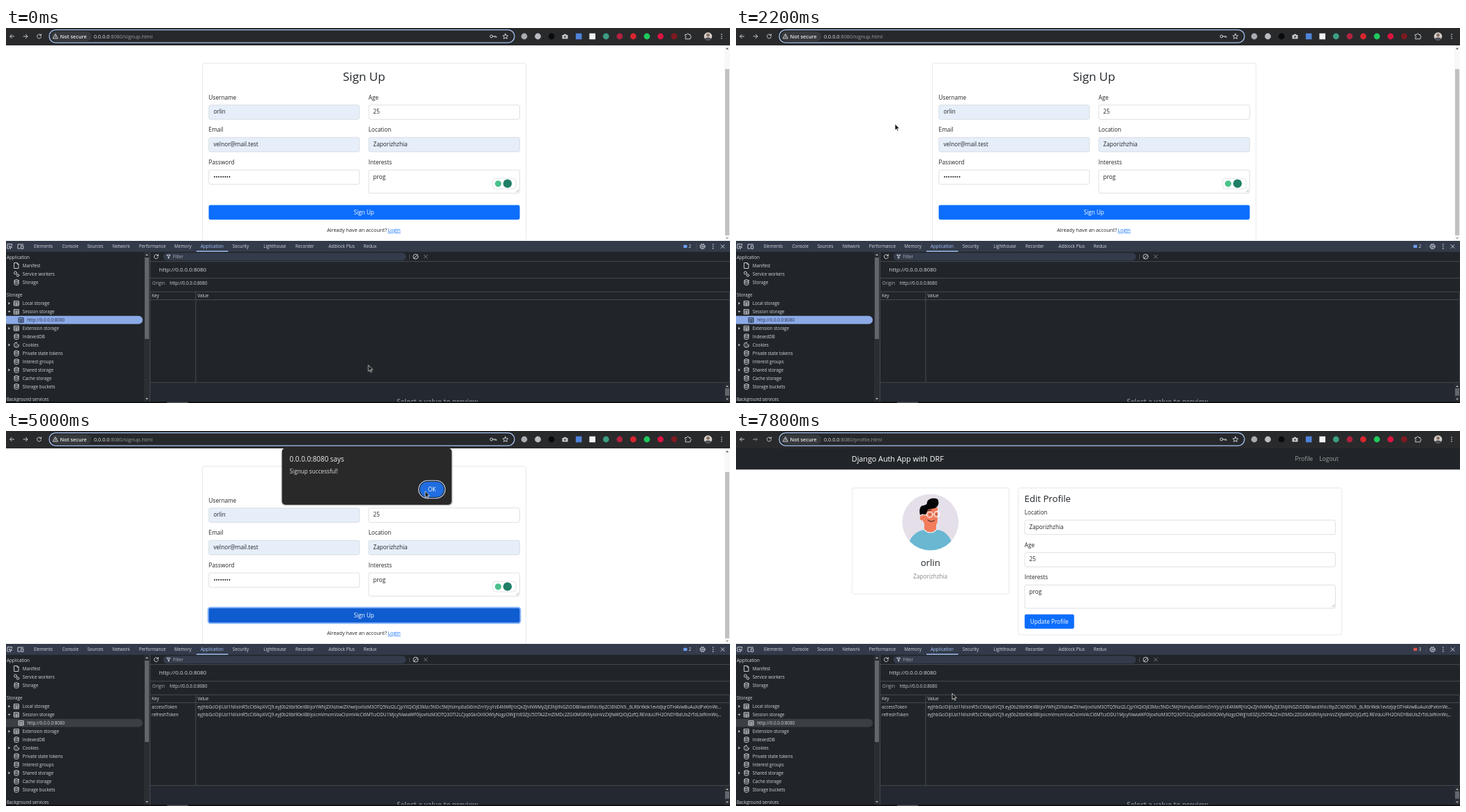
Animation of 1038 by 539 pixels, one loop 8 s. Source, as an HTML page:

```html
<!DOCTYPE html>
<html lang="en">
<head>
<meta charset="utf-8">
<title>Sign up and profile</title>
<style>
html, body { margin: 0; width: 100%; height: 100%; overflow: hidden; background: #212529; }
svg { display: block; width: 100vw; height: 100vh; }
text { font: 8.2px "Open Sans", "Noto Sans", sans-serif; fill: #212529; white-space: pre; }
.mid { text-anchor: middle; }
.h1 { font-size: 17px; }
.h2 { font-size: 13.2px; }
.link { font-size: 7.27px; fill: #0d6efd; text-decoration: underline; }
.note { font-size: 7.27px; }
.nav { font-size: 8.5px; fill: #a0a2a4; }
.brand { font-size: 10.75px; fill: #fff; }
.url { font-size: 7.3px; fill: #9a9da2; }
.url .host { fill: #e6e7e9; }
.white { fill: #fff; }
.dev text { font-size: 6.3px; fill: #d4d8dd; }
.dev .on { fill: #a8c7fa; }
.dev .title { font-size: 7.9px; }
.dev .dim { fill: #aab0b8; }
.line { fill: none; stroke: #c7cbd1; stroke-width: 1; stroke-linecap: round; stroke-linejoin: round; }
.rule { stroke: #50565f; stroke-width: .8; fill: none; }
.card { fill: #fff; stroke: #dfe1e5; stroke-width: .8; }
.box { fill: #fff; stroke: #d3d8de; stroke-width: .8; }
.auto { fill: #e6eef9; }

.t { animation: 8s step-end infinite; }
.signup { animation-name: signup; }
.profile { animation-name: profile; }
.loading { animation-name: loading; }
.settled { animation-name: settled; }
.loaded { animation-name: loaded; }
.before { animation-name: before; }
.clicked { animation-name: clicked; }
.hover { animation-name: hover; }
.tokens { animation-name: tokens; }
.dialog { animation-name: dialog; }
.scroll { animation-name: scroll; }
.thumb { animation-name: thumb; }
.cursor { animation-name: cursor; }
.arrow { animation-name: arrow; }
.beam { animation-name: beam; }
@keyframes signup { from { opacity: 1 } 72.5%, to { opacity: 0 } }
@keyframes profile { from { opacity: 0 } 72.5%, to { opacity: 1 } }
@keyframes loading { from { opacity: 0 } 72.5% { opacity: 1 } 75%, to { opacity: 0 } }
@keyframes settled { from { opacity: 1 } 72.5% { opacity: 0 } 75%, to { opacity: 1 } }
@keyframes loaded { from { opacity: 0 } 75%, to { opacity: 1 } }
@keyframes before { from { opacity: 1 } 45%, to { opacity: 0 } }
@keyframes clicked { from { opacity: 0 } 45%, to { opacity: 1 } }
@keyframes hover { from { opacity: 0 } 45%, to { opacity: 1 } }
@keyframes tokens { from { opacity: 0 } 57.5%, to { opacity: 1 } }
@keyframes dialog {
  from { opacity: 0; transform: none }
  57.5% { opacity: 1; transform: none }
  72.5% { opacity: .2; transform: translateY(-4.8px) }
  75%, to { opacity: 0; transform: none }
}
@keyframes scroll { from { transform: none } 22.5% { transform: translateY(2.6px) } 25%, to { transform: none } }
@keyframes thumb { from { transform: none } 22.5% { transform: translateY(-2px) } 25%, to { transform: none } }
@keyframes cursor {
  0% { transform: translate(519.5px, 484.5px) }
  2.5% { transform: translate(590px, 505px) }
  5% { transform: translate(680px, 462px) }
  7.5% { transform: translate(520px, 440px) }
  10% { transform: translate(260px, 425px) }
  12.5% { transform: translate(24px, 400px) }
  15% { transform: translate(160px, 124px) }
  17.5% { transform: translate(196px, 128px) }
  20% { transform: translate(222px, 133px) }
  22.5% { transform: translate(231px, 135px) }
  27.5% { transform: translate(228px, 138px) }
  32.5% { transform: translate(223px, 141px) }
  35% { transform: translate(240px, 150px) }
  37.5% { transform: translate(300px, 180px) }
  40% { transform: translate(390px, 215px) }
  42.5% { transform: translate(480px, 246px) }
  45% { transform: translate(528px, 262px) }
  50% { transform: translate(531px, 246px) }
  52.5% { transform: translate(529px, 219px) }
  55% { transform: translate(548px, 180px) }
  57.5% { transform: translate(574px, 130px) }
  60% { transform: translate(596px, 95px) }
  62.5% { transform: translate(601px, 86.5px) }
  72.5% { transform: translate(613.7px, 149px) }
  75% { transform: translate(746px, 161px) }
  77.5% { transform: translate(749px, 164px) }
  80% { transform: translate(752px, 167px) }
  85% { transform: translate(700px, 188px) }
  87.5% { transform: translate(600px, 240px) }
  90% { transform: translate(480px, 300px) }
  92.5% { transform: translate(390px, 350px) }
  95% { transform: translate(330px, 372px) }
  97.5%, 100% { transform: translate(310px, 377px) }
}
@keyframes arrow {
  from { opacity: 1 } 40% { opacity: 0 } 42.5% { opacity: 1 } 52.5% { opacity: 0 } 55% { opacity: 1 }
  72.5% { opacity: 0 } 75% { opacity: 1 } 85% { opacity: 0 } 90%, to { opacity: 1 }
}
@keyframes beam {
  from { opacity: 0 } 40% { opacity: 1 } 42.5% { opacity: 0 } 52.5% { opacity: 1 } 55% { opacity: 0 }
  72.5% { opacity: 1 } 75% { opacity: 0 } 85% { opacity: 1 } 90%, to { opacity: 0 }
}
</style>
</head>
<body>
<svg viewBox="0 0 1038 539">
  <defs>
    <clipPath id="view"><rect y="25" width="1038" height="280.5"/></clipPath>
    <clipPath id="cell"><rect x="272" y="390" width="748.5" height="24"/></clipPath>
    <clipPath id="disc"><circle cx="278.7" cy="131" r="40.5"/></clipPath>
    <clipPath id="pane"><rect x="207" y="511" width="822" height="26.5"/></clipPath>
    <g id="doc"><path class="line" d="M-3-4H1L3-2V4H-3ZM1-4V-2H3"/></g>
    <g id="db" class="line"><ellipse cy="-2.4" rx="3" ry="1.3"/><path d="M-3-2.4V2.6C-3 4.3 3 4.3 3 2.6V-2.4M-3 .1C-3 1.8 3 1.8 3 .1"/></g>
    <g id="grid"><path class="line" d="M-3.3-3.3H3.3V3.3H-3.3ZM-3.3-1H3.3M-3.3 1.2H3.3M0-1V3.3"/></g>
    <g id="gears" class="line"><circle cx="-1.5" cy="-1.5" r="2"/><circle cx="2" cy="2" r="1.7"/></g>
    <g id="cookie" class="line"><path d="M0-3.6A3.6 3.6 0 1 0 3.6 0C2 .3 1.3-.5 1.4-1.5C.2-1.4-.4-2.4 0-3.6Z"/><path d="M-1.4-.6h.1M-.8 1.6h.1M1 1.4h.1"/></g>
    <g id="reload"><path class="line" d="M2.6-1.6A3 3 0 1 0 3 .6M3-3.2V-1.2H1"/></g>
    <path id="cross" class="line" d="M-2.4-2.4L2.4 2.4M2.4-2.4L-2.4 2.4"/>
    <g id="dots"><circle cy="-2.9" r=".8"/><circle r=".8"/><circle cy="2.9" r=".8"/></g>
    <path id="tri" d="M-2 1.1H2L0-1.3Z"/>
  </defs>

  <!-- page -->
  <rect y="25" width="1038" height="281" fill="#fff"/>
  <g clip-path="url(#view)">
    <g class="t signup">
      <g class="t scroll">
        <rect y="-6" width="1038" height="30.6" fill="#212529"/>
        <rect class="card" x="281.6" y="50.7" width="464" height="290" rx="3"/>
        <text class="h1 mid" x="513.3" y="76">Sign Up</text>
        <g id="form"></g>
        <path d="M731.5 235.8L735 232.3M733.7 235.8L735 234.5" stroke="#777" stroke-width=".6"/>
        <rect x="697.7" y="216.3" width="33.5" height="14.8" rx="4" fill="#fff" stroke="#d9dce0" stroke-width=".8"/>
        <circle cx="705.6" cy="223.8" r="4.6" fill="#4cc18c"/>
        <circle cx="719" cy="223.6" r="6.2" fill="#1f7f66"/>
        <rect x="290.6" y="254.6" width="446" height="20.8" rx="2.4" fill="#0d6efd"/>
        <g class="t hover">
          <rect x="289.8" y="253.8" width="447.6" height="22.4" rx="3.2" fill="none" stroke="#86b4fa" stroke-width="2"/>
          <rect x="290.8" y="254.8" width="445.6" height="20.4" rx="2.2" fill="#0e5cd0"/>
        </g>
        <text class="white mid" x="513.3" y="268">Sign Up</text>
        <text class="note" x="460.2" y="293.3">Already have an account?</text>
        <text class="link" x="547.3" y="293.3">Login</text>
      </g>
      <rect x="1030" y="25" width="8" height="281" fill="#f8f8f8"/>
      <rect class="t thumb" x="1031" y="59" width="6" height="239" fill="#c1c1c1"/>
      <use href="#tri" x="1034" y="29.5" fill="#505050"/>
      <use href="#tri" transform="translate(1034 302) scale(1 -1)" fill="#9a9a9a"/>
    </g>

    <g class="t profile">
      <rect y="25" width="1038" height="281" fill="#fff"/>
      <rect y="25" width="1038" height="30.4" fill="#212529"/>
      <text class="brand" x="165.8" y="43.8">Django Auth App with DRF</text>
      <text class="nav" x="801.6" y="43">Profile</text>
      <text class="nav" x="836.2" y="43">Logout</text>
      <rect class="card t loading" x="166.4" y="81.8" width="225" height="116.4" rx="3"/>
      <rect class="card t loaded" x="166.4" y="81.8" width="225" height="152.3" rx="3"/>
      <g clip-path="url(#disc)">
        <circle cx="278.7" cy="131" r="40.5" fill="#e5dfea"/>
        <path d="M245 173C247 155 256 144 270 142H287C302 143 309 154 313 173Z" fill="#6ab7d1"/>
        <path d="M270 128V142C274 147 283 147 287 142V130Z" fill="#f27c5c"/>
        <path d="M269.5 141.5C274 147.5 283 147.5 287.5 141.5" fill="none" stroke="#fff" stroke-width="1.2"/>
        <path d="M268 110H289V127C289 137 283 139 279 138C272 137 267 131 267 124Z" fill="#f27c5c"/>
        <circle cx="267" cy="125" r="3.4" fill="#f27c5c"/>
        <path d="M264 121C262 113 264 107 269 107C272 106 274 106 274 102C276 96 285 96 289 98C292 103 290 109 285 111C281 112 278 112 275 113C274 117 272 120 270 121C268 119 266 119 264 121Z" fill="#050505"/>
        <path d="M267 120L274 121M281.7 119.8H284" stroke="#fff" fill="none"/>
        <circle cx="277.8" cy="120.3" r="4" fill="none" stroke="#fff" stroke-width="1.1"/>
        <circle cx="288" cy="119.5" r="3.9" fill="none" stroke="#fff" stroke-width="1.1"/>
        <path d="M275 114.5L280 113.8M278 120h.6M287 119.5h.6M275 128C278 131 283 130.5 285 128" fill="none" stroke="#151515" stroke-linecap="round"/>
      </g>
      <g class="t loaded">
        <text class="h2 mid" x="278.7" y="193.8">orlin</text>
        <text class="mid" x="278.7" y="212.2" style="fill:#818589">Zaporizhzhia</text>
      </g>
      <rect class="card" x="404.6" y="81.8" width="464" height="211.2" rx="3"/>
      <text class="h2" x="413.6" y="102.4">Edit Profile</text>
      <g id="edit"></g>
      <path d="M854.5 253L858 249.5M856.7 253L858 251.7" stroke="#777" stroke-width=".6"/>
      <rect x="413.8" y="263.4" width="71" height="20.8" rx="2.4" fill="#0d6efd"/>
      <text class="white mid" x="449.2" y="276.6">Update Profile</text>
    </g>
  </g>

  <!-- browser bar -->
  <rect width="1038" height="25" fill="#292a2c"/>
  <rect x="62" y="2.6" width="667" height="18.6" rx="9.3" fill="#27282b" stroke="#a5c2f2" stroke-width="1.3"/>
  <rect x="64.5" y="5" width="58" height="14" rx="7" fill="#37393c"/>
  <path class="line" d="M11.5 12H5.8M8.3 9.3L5.6 12L8.3 14.7"/>
  <path class="line" d="M25 12H30.8M28.3 9.3L31 12L28.3 14.7"/>
  <path class="line t profile" d="M25 12H30.8M28.3 9.3L31 12L28.3 14.7" style="stroke:#5c5e62"/>
  <g class="t settled"><use href="#reload" x="47.5" y="12"/></g>
  <g class="t loading"><use href="#cross" x="47.5" y="12"/></g>
  <path class="line" d="M71 8.8L74.4 15H67.6ZM71 11V12.6M71 13.8V13.9"/>
  <text x="77.6" y="14.7" style="font-size:7.3px;font-weight:600;fill:#e8e9eb">Not secure</text>
  <text class="url t signup" x="126" y="14.7"><tspan class="host">0.0.0.0</tspan>:8080/signup.html</text>
  <text class="url t profile" x="126" y="14.7"><tspan class="host">0.0.0.0</tspan>:8080/profile.html</text>
  <g class="line"><circle cx="696" cy="12" r="2"/><path d="M698 12H703V13.6M701 12V13.4"/>
    <path d="M716 8.2L717.1 10.8L719.8 11L717.7 12.8L718.4 15.5L716 14L713.6 15.5L714.3 12.8L712.2 11L714.9 10.8Z"/></g>
  <g id="tools"></g>
  <path d="M797.5 10H799.5L800.3 8.8H802.7L803.5 10H805.5V15.5H797.5Z" fill="#c9ccd0"/>
  <circle cx="801.5" cy="12.6" r="1.6" fill="#5b5e63"/>
  <path class="line" d="M974 9.5H976.2C976 7.2 979 7.2 978.8 9.5H981V11.5C983 11.4 983 14 981 13.8V15.8H974V13.6C975.8 13.5 975.8 11.6 974 11.6Z"/>
  <circle cx="1006.5" cy="12" r="5.8" fill="#d5cfca"/>
  <path d="M1002 15.7C1003 12.8 1010 12.8 1011 15.7A5.8 5.8 0 0 1 1002 15.7Z" fill="#4a4d55"/>
  <circle cx="1006.5" cy="10.3" r="2.4" fill="#8a6f62"/>
  <use href="#dots" x="1026" y="12" fill="#d5d8dc"/>

  <!-- developer tools -->
  <g class="dev">
    <rect y="306" width="1038" height="233" fill="#212529"/>
    <rect y="306.3" width="1038" height="15.4" fill="#333b4b"/>
    <path class="line" d="M4 317H2V310.6H8.6V312.5M4.8 313.3L8.8 314.8L7 315.4L6.4 317.2Z"/>
    <path class="line" d="M20 317H17V311H24.5M22 313H24.8V317.2H22Z"/>
    <g id="tabs"></g>
    <rect x="273" y="320.2" width="45.5" height="1.4" fill="#a8c7fa"/>
    <g class="t signup"><rect x="971.3" y="311.7" width="5.2" height="4.4" rx=".8" fill="#6f9ff2"/><text x="978.8" y="316.3">2</text></g>
    <g class="t profile"><rect x="971.3" y="311.7" width="5.2" height="4.4" rx=".8" fill="#e0524a"/><text x="978.8" y="316.3">3</text></g>
    <path class="rule" d="M990 309.5V318.5"/>
    <circle class="line" cx="998.6" cy="314" r="3"/><circle class="line" cx="998.6" cy="314" r="1"/>
    <circle cx="998.6" cy="314" r="3.8" fill="none" stroke="#c7cbd1" stroke-dasharray="1.5 1.5"/>
    <use href="#dots" x="1013.8" y="314" fill="#d5d8dc"/>
    <use href="#cross" x="1027.5" y="314"/>

    <rect class="t before" x="-6" y="413.8" width="202" height="11.8" rx="5.9" fill="#8caae6"/>
    <rect class="t clicked" x="-6" y="413.8" width="202" height="11.8" rx="5.9" fill="#3b3f45"/>
    <g class="t before">
      <path class="line" d="M18.4 416.5H25V423.1H18.4ZM18.4 418.8H25M18.4 421H25M21.7 418.8V423.1" style="stroke:#26354f"/>
      <text x="30.2" y="422" style="fill:#26354f">http://0.0.0.0:8080</text>
    </g>
    <g class="t clicked"><use href="#grid" x="21.7" y="419.8"/><text x="30.2" y="422">http://0.0.0.0:8080</text></g>
    <g id="tree"></g>
    <rect x="198" y="322" width="8" height="216" fill="#2b2e33"/>
    <rect x="199" y="330" width="6" height="117" fill="#63676d"/>
    <use href="#tri" x="202" y="326" fill="#b5b9be"/>
    <use href="#tri" transform="translate(202 533) scale(1 -1)" fill="#b5b9be"/>

    <path class="rule" d="M206.6 322V538M207 335.6H1038M207 359.6H1038M207 379.2H1037.4V509.6H207M207 390.6H1037M272 379V509.6M578.5 325V332.5"/>
    <use href="#reload" x="215.3" y="328.6"/>
    <rect x="225.5" y="323.2" width="348" height="10.8" rx="5.4" fill="#343c4c"/>
    <path class="line" d="M230.8 326.3H235.6L233.7 328.8V331H232.7V328.8Z"/>
    <text class="dim" x="239.3" y="330.8">Filter</text>
    <circle class="line" cx="587.3" cy="328.6" r="3.5"/><path class="line" d="M584.8 331.1L589.8 326.1"/>
    <use href="#cross" x="601.7" y="328.6" opacity=".5"/>
    <text class="title" x="219.6" y="350.3">http://0.0.0.0:8080</text>
    <text class="dim" x="209.8" y="369.3">Origin</text>
    <text x="234.6" y="369.3">http://0.0.0.0:8080</text>
    <text x="209" y="387.3">Key</text>
    <text x="274.4" y="387.3">Value</text>
    <g class="t tokens" id="rows"></g>
    <rect x="207" y="510.6" width="831" height="27" fill="#242931"/>
    <g clip-path="url(#pane)"><text class="mid" x="618.5" y="541" style="font-size:9.8px;font-weight:600;fill:#8b9097">Select a value to preview</text></g>
    <rect x="1030" y="511" width="8" height="27" fill="#2b2e33"/>
    <rect x="1031" y="518" width="6" height="10.5" fill="#63676d"/>
    <use href="#tri" x="1034" y="515" fill="#b5b9be"/>
    <use href="#tri" transform="translate(1034 533.5) scale(1 -1)" fill="#b5b9be"/>
    <rect y="537.4" width="1038" height="1.6" fill="#0c0d0f"/>
    <rect x="231" y="537.6" width="30" height="1.4" fill="#55585d"/>
  </g>

  <!-- alert -->
  <g class="t dialog">
    <rect x="394.5" y="25" width="246" height="82.5" rx="6" fill="#000" opacity=".22"/>
    <rect x="395.7" y="24.5" width="243.2" height="81.5" rx="5" fill="#292929"/>
    <text x="406.6" y="44.2" style="font-size:9.9px;font-weight:500;fill:#eceded">0.0.0.0:8080 says</text>
    <text x="406.6" y="60.6" style="fill:#dcdddd">Signup successful!</text>
    <rect x="591.6" y="71.3" width="38" height="25.4" rx="12.7" fill="#292929" stroke="#c6dafc" stroke-width="1.1"/>
    <rect x="593.4" y="73.1" width="34.4" height="21.8" rx="10.9" fill="#1f6de0"/>
    <text class="mid white" x="610.6" y="87">OK</text>
  </g>

  <g class="t cursor">
    <path class="t arrow" d="M0 0V9L2.1 7.1L3.5 10.2L4.9 9.6L3.5 6.6H6.3Z" fill="#111" stroke="#fff" stroke-width=".7"/>
    <path class="t beam" d="M-1.8-4.2H-.6L0-3.7L.6-4.2H1.8M0-3.7V3.7M-1.8 4.2H-.6L0 3.7L.6 4.2H1.8" fill="none" stroke="#222" stroke-width=".9"/>
  </g>
</svg>
<script>
const fill = (id, parts) => document.getElementById(id).innerHTML = parts.join("");
const text = (x, y, s, cls = "") => `<text x="${x}" y="${y}" class="${cls}">${s}</text>`;
const field = (label, value, x, y, w, h = 20.6, box = "", val = "") =>
  text(x - .2, y - 8.2, label) +
  `<rect class="box ${box}" x="${x}" y="${y}" width="${w}" height="${h}" rx="2.4"/>` +
  text(x + 6.6, y + 12.7, value, val);

fill("form", [
  field("Username", "orlin", 290.8, 110.7, 216, 20.6, "auto"),
  field("Email", "velnor@mail.test", 290.8, 157.3, 216, 20.6, "auto"),
  field("Password", "••••••••", 290.8, 204, 216),
  field("Age", "25", 520, 110.7, 216.4),
  field("Location", "Zaporizhzhia", 520, 157.3, 216.4, 20.6, "auto"),
  field("Interests", "prog", 520, 204, 216.4, 33.4)
]);

fill("edit", [
  ["Location", "Zaporizhzhia", 128.1],
  ["Age", "25", 174.7],
  ["Interests", "prog", 221.4, 33.4]
].map(([label, value, y, h]) => field(label, value, 414, y, 445.4, h, "", "t loaded")));

const tools = ["#a9acb0", "#b9bcc0", "#0b0b0c", "", "#4f83d9", "#f1f2f3", "#3d9d83", "#b3223f",
  "#d8262f", "#1fc95c", "#dc1440", "#7d1a20"];
const square = [4, 5];
fill("tools", tools.map((c, i) => {
  const x = 743 + i * 19.54;
  if (!c) return "";
  return square.includes(i)
    ? `<rect x="${x - 4.3}" y="7.7" width="8.6" height="8.6" fill="${c}"/>`
    : `<circle cx="${x}" cy="12" r="4.4" fill="${c}"/>`;
}));

fill("tabs", [
  ["Elements", 40], ["Console", 80.4], ["Sources", 116.4], ["Network", 152.4], ["Performance", 190.8],
  ["Memory", 241.3], ["Application", 279], ["Security", 324.8], ["Lighthouse", 369.2],
  ["Recorder", 415], ["Adblock Plus", 462.6], ["Redux", 512.8]
].map(([s, x]) => text(x, 316.3, s, s === "Application" ? "on" : "")));

const item = (s, y, icon, fold) =>
  text(icon ? 23.8 : 1, y + 2.2, s) +
  (icon ? `<use href="#${icon}" x="15" y="${y}"/>` : "") +
  (fold ? `<use href="#tri" fill="#d4d8dd" transform="translate(4.6 ${y}) rotate(${fold})"/>` : "");
fill("tree", [
  item("Application", 329.5),
  item("Manifest", 341.5, "doc"),
  item("Service workers", 353.5, "gears"),
  item("Storage", 365.5, "db"),
  item("Storage", 384),
  item("Local storage", 395.8, "grid", 90),
  item("Session storage", 407.8, "grid", 180),
  item("Extension storage", 431.7, "grid", 90),
  item("IndexedDB", 443.6, "db"),
  item("Cookies", 455.6, "cookie", 90),
  item("Private state tokens", 467.5, "db"),
  item("Interest groups", 479.5, "db"),
  item("Shared storage", 491.4, "db", 90),
  item("Cache storage", 503.4, "db"),
  item("Storage buckets", 515.3, "db"),
  item("Background services", 533.5)
]);

const head = "eyJhbGciOiJIUzI1NiIsInR5cCI6IkpXVCJ9.eyJ0b2tlbl90eXBlIjoi";
const row = (key, value, y) =>
  text(209, y, key) + `<g clip-path="url(#cell)">${text(274.4, y, head + value)}</g>` + text(1020.5, y, "…");
fill("rows", [
  row("accessToken", "YWNjZXNzIiwiZXhwIjoxNzM3OTQ5NzI2LCJpYXQiOjE3Mzc5NDc5MjYsImp0aSI6ImZmYjcyYzE4NWRjYzQxZjhiNWMyZjE3" +
    "NjllNGZlODBlIiwidXNlcl9pZCI6NDN9._6LR6rWdk1evtdJqrDTHAVwBuAuXdPxKmWq", 398.6),
  row("refreshToken", "cmVmcmVzaCIsImV4cCI6MTczODU1MjcyNiwiaWF0IjoxNzM3OTQ3OTI2LCJqdGkiOiI0OWIyNzgzOWJjYzE0ZjU5OTA2ZmZl" +
    "MDc2ZGI0MGRiNyIsInVzZXJfaWQiOjQzfQ.REVduUFH2ONDYBdUlsZrTdLbifKmWqTz", 409.6)
]);
</script>
</body>
</html>
```
